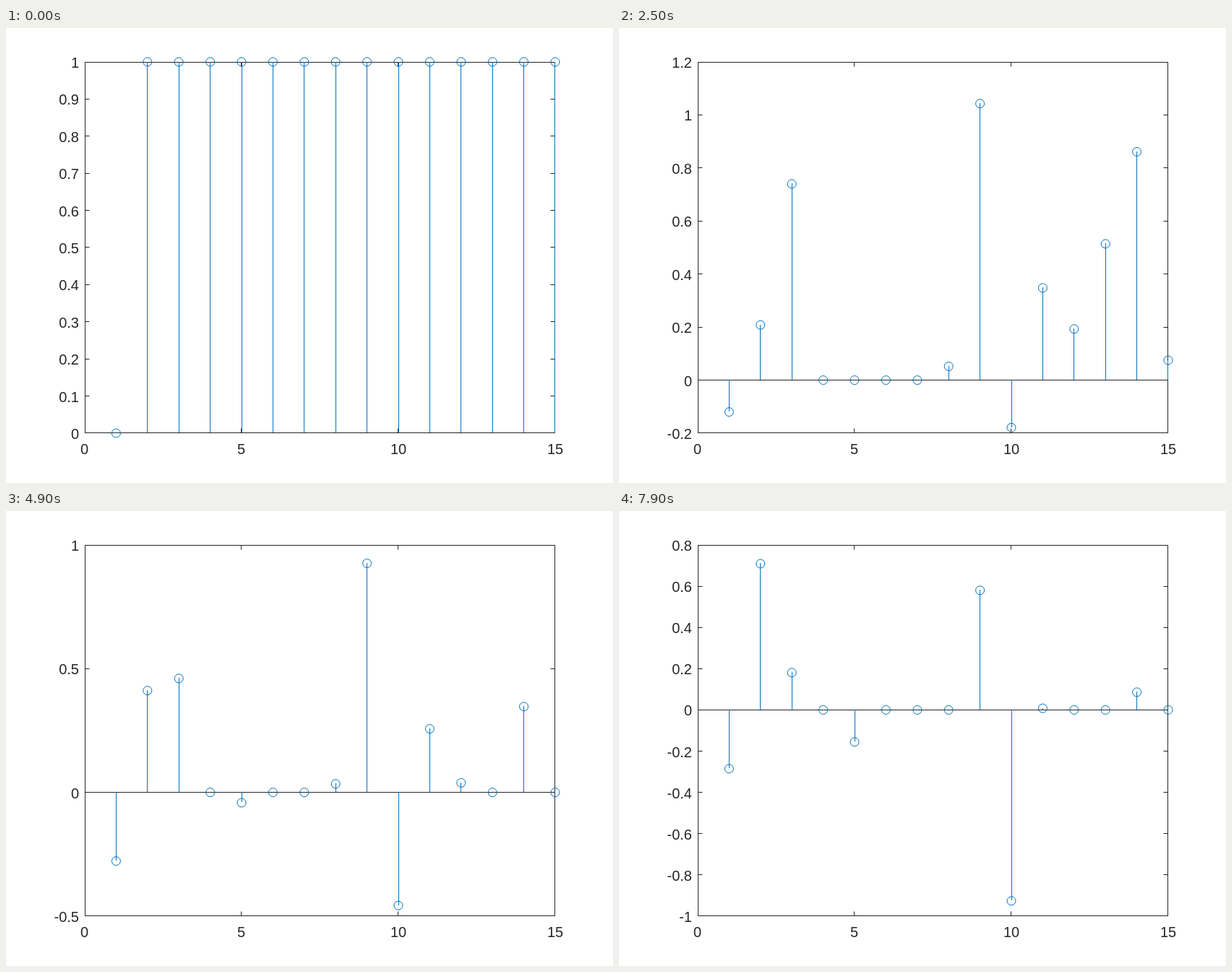
These frames come from a looping animation (840x630 px, 8000 ms). An HTML page:

```html
<!DOCTYPE html>
<html lang="en">
<head>
<meta charset="utf-8">
<title>Coordinate descent</title>
<style>
  html, body { margin: 0; width: 100%; height: 100%; overflow: hidden; background: #fff; }
  svg { display: block; width: 840px; height: 630px; }
  text { font: 20px "Liberation Sans", Arial, sans-serif; fill: #262626; }
  .axis { fill: #262626; }
  .stem { fill: #0072bd; }
  circle { fill: none; stroke: #0072bd; stroke-width: 1; }
</style>
</head>
<body>
<svg id="plot" viewBox="0 0 840 630"></svg>
<script>
const LEFT = 109, TOP = 47, WIDTH = 651, HEIGHT = 514;
const RIGHT = LEFT + WIDTH, BOTTOM = TOP + HEIGHT;
const COUNT = 15, STEP = 100, LOOP = 8000, TICK = 6.5, DIGIT = 11;

// Path of each coordinate: first sweep, second sweep, last sweep, bend of the way between.
const paths = [
  [0, -.12, -.285, .07],
  [.219, .208, .709, 1.3],
  [.784, .74, .181],
  [.07],
  [0, 0, -.155, 1.9],
  [.304],
  [.008],
  [.475, .052],
  [.996, 1.043, .58, 1.25],
  [.084, -.179, -.926, .9],
  [.532, .348, .008, 1.2],
  [.193, .058],
  [.514],
  [.861, .572, .086, .7],
  [.075]
];
const plot = document.getElementById("plot");

// One coordinate is updated per step, in cyclic order, starting from all ones.
function valueAt(step, [first, second = 0, last = 0, bend = 1], i) {
  const sweep = Math.floor((step - i) / COUNT);
  if (sweep < 0) return 1;
  if (sweep === 0) return first;
  const sweeps = Math.floor((LOOP / STEP - 1 - i) / COUNT);
  const part = (sweep - 1) / (sweeps - 1);
  // Shrunk to zero at the second sweep and never revived.
  if (second === last) return last;
  return second + (last - second) * part ** bend;
}

// Tightest limits with at most ten intervals; the finer step wins a tie.
function fitLimits(values) {
  const min = Math.min(0, ...values), max = Math.max(0, ...values);
  let best = null;
  for (const size of [.1, .2, .5]) {
    const lo = Math.floor(min / size + 1e-6), hi = Math.ceil(max / size - 1e-6);
    const span = (hi - lo) * size;
    if (hi - lo <= 10 && (!best || span < best.span - 1e-6)) best = { lo, hi, size, span };
  }
  return best;
}

// Pixel that ends at, or contains, a coordinate; kept inside the axes box.
const snap = (v, low) => Math.max(low, Math.ceil(v - 1e-6) - 1);
const rect = (cls, x, y, w, h) =>
  `<rect class="${cls}" x="${x}" y="${y}" width="${w}" height="${h}"/>`;
const label = (x, y, anchor, value) =>
  `<text x="${x}" y="${y}" text-anchor="${anchor}">${value}</text>`;

function render(step) {
  const values = paths.map((path, i) => valueAt(step, path, i));
  const { lo, hi, size, span } = fitLimits(values);
  const toX = n => LEFT + n * WIDTH / COUNT;
  const toY = v => TOP + (hi * size - v) / span * HEIGHT;
  const row = v => snap(toY(v), TOP);
  const out = [
    rect("axis", LEFT, TOP, WIDTH, 1),
    rect("axis", LEFT, BOTTOM - 1, WIDTH, 1),
    rect("axis", LEFT, TOP, 1, HEIGHT),
    rect("axis", RIGHT - 1, TOP, 1, HEIGHT)
  ];

  for (let n = 0; n <= COUNT; n += 5) {
    const x = snap(toX(n), LEFT);
    const start = Math.floor(toX(n) - DIGIT * String(n).length / 2);
    out.push(rect("axis", x, TOP, 1, TICK), rect("axis", x, BOTTOM - TICK, 1, TICK),
      label(start, 590, "start", n));
  }
  for (let k = lo; k <= hi; k++) {
    const y = row(k * size);
    out.push(rect("axis", LEFT, y, TICK, 1), rect("axis", RIGHT - TICK, y, TICK, 1),
      label(101, Math.round(toY(k * size) + 8), "end", k ? +(k * size).toFixed(1) : 0));
  }

  const zero = row(0);
  out.push(rect("axis", LEFT, zero, WIDTH, 1));
  values.forEach((v, i) => {
    const x = toX(i + 1), end = row(v);
    const col = Math.min(Math.floor(x), RIGHT - 1);
    out.push(rect("stem", col, Math.min(zero, end), 1, Math.abs(zero - end)),
      `<circle cx="${x.toFixed(2)}" cy="${toY(v).toFixed(2)}" r="6"/>`);
  });
  plot.innerHTML = out.join("");
}

let shown = -1;
function tick() {
  const step = Math.floor(performance.now() % LOOP / STEP);
  if (step !== shown) render(shown = step);
  requestAnimationFrame(tick);
}
tick();
</script>
</body>
</html>
```
